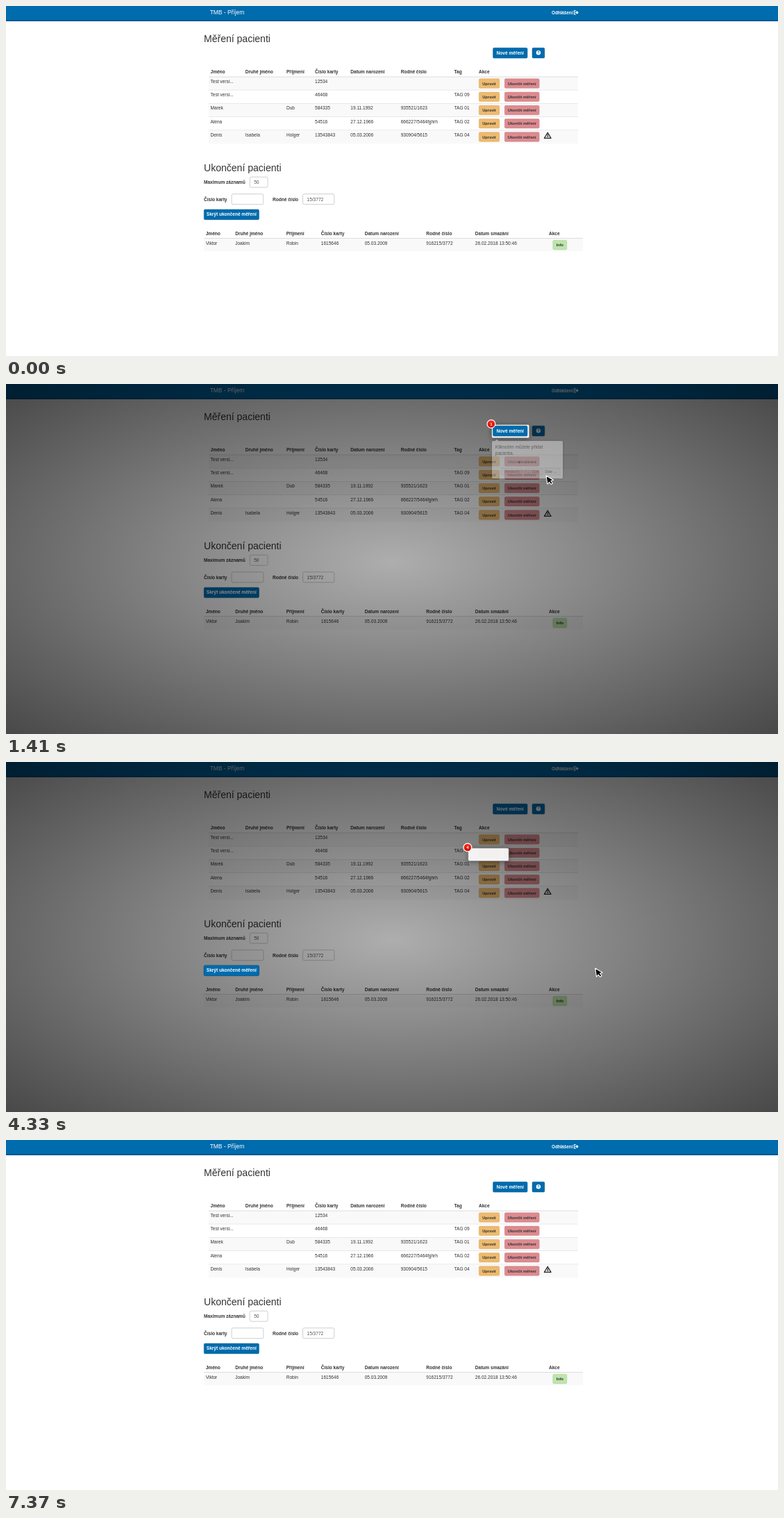
Write an HTML page that moves like this. It is 1112 px wide and 504 px high and loops after 8670 ms.

```html
<!DOCTYPE html>
<html lang="cs">
<head>
<meta charset="utf-8">
<title>Měření pacienti</title>
<style>
html, body { margin: 0; width: 100%; height: 100%; overflow: hidden; background: #fff; }
svg { display: block; position: absolute; left: 0; top: 0; }
text { font: 6.55px "Liberation Sans", Arial, sans-serif; fill: #333; white-space: pre; }
.b { font-weight: 700; }
.s { font-size: 5.65px; font-weight: 700; }
.w { fill: #fff; }
.h { font-size: 14.04px; }
.in { fill: #555; }
.t { font-size: 5.15px; }
#helper { fill: #fff; fill-opacity: .93; stroke: #777; stroke-width: .5; filter: drop-shadow(0 1px 3px rgba(0,0,0,.45)); }
.tip { filter: drop-shadow(0 .5px 2px rgba(0,0,0,.4)); }
</style>
</head>
<body>
<svg id="stage" width="1112" height="504" viewBox="0 0 1112 504">
  <defs>
    <radialGradient id="shade" gradientUnits="userSpaceOnUse" cx="0" cy="0" r="1"
      gradientTransform="translate(556 256) scale(786 358)">
      <stop offset="0" stop-opacity=".4"/><stop offset="1" stop-opacity=".9"/>
    </radialGradient>
    <linearGradient id="red" x1="0" y1="0" x2="0" y2="1">
      <stop offset="0" stop-color="#ff3019"/><stop offset="1" stop-color="#cf0404"/>
    </linearGradient>
  </defs>
  <g id="page"></g>
  <rect id="overlay" width="1112" height="504" fill="url(#shade)"/>
  <g id="guide">
    <rect id="helper" rx="1.8"/>
    <use id="raised"/>
    <g id="badge">
      <circle r="5.9" fill="url(#red)" stroke="#fff" stroke-width="1.2"/>
      <text id="num" class="b w" y="2.1" text-anchor="middle" style="font-size:6px"></text>
    </g>
    <g id="tips"></g>
  </g>
  <path id="cursor" d="M0 0 1 12.2 3.9 9.6 6.4 13 8.6 11.5 6.3 8 10 7Z"
    fill="#000" stroke="#fff" stroke-width="1.1" stroke-linejoin="round"/>
</svg>
<script>
const $ = id => document.getElementById(id);
const LOOP = 8670, BLUE = '#006bad', APP = 'TMB - Příjem';

const text = (x, y, s, cls = '', extra = '') => `<text x="${x}" y="${y}" class="${cls}" ${extra}>${s}</text>`;
const rect = (x, y, w, h, fill, extra = '') => `<rect x="${x}" y="${y}" width="${w}" height="${h}" fill="${fill}" ${extra}/>`;
const button = (x, y, w, h, label, fill, edge, cls, id = '') =>
  `<g ${id && `id="${id}"`}>${rect(x, y, w, h, fill, `rx="1.6" stroke="${edge}" stroke-width=".5"`)}
  ${text(x + w / 2, y + h / 2 + 2.1, label, cls, 'text-anchor="middle"')}</g>`;
const input = (x, y, w, label) =>
  rect(x, y, w, 15, '#fff', 'rx="2" stroke="#bbb" stroke-width=".7"') + text(x + 6, y + 9.9, label, 'in');
const cells = (xs, y, row, cls) => row.map((s, i) => s && text(xs[i], y, s, cls)).join('');

function header() {
  return `<g id="bar">${rect(0, 0, 1112, 22, BLUE)}${rect(0, 20.2, 1112, 1.6, '#00528a')}
    ${text(293.7, 12.4, APP, 'w', 'style="font-size:8.42px"')}
    ${text(786, 11.6, 'Odhlášení', 'b w', 'style="font-size:6.3px"')}
    <path d="M821 6.7H818.3V12H821" fill="none" stroke="#fff" stroke-width="1.1"/>
    <path d="M819.8 8.5H822V6.7L824.8 9.4 822 12.1V10.3H819.8Z" fill="#fff"/></g>`;
}

function measured() {
  const xs = [294.5, 344.7, 404, 445, 496.3, 568.7, 645.5, 681];
  const rows = [
    ['Test versi...', '', '', '12534'],
    ['Test versi...', '', '', '46468', '', '', 'TAG 09'],
    ['Marek', '', 'Dub', '584335', '19.11.1992', '935521/1623', 'TAG 01'],
    ['Alena', '', '', '54516', '27.12.1966', '666227/5464fghrh', 'TAG 02'],
    ['Denis', 'Isabela', 'Holger', '13543843', '05.03.2006', '930904/5615', 'TAG 04']
  ];
  let out = text(285, 52.4, 'Měření pacienti', 'h') +
    button(701.5, 60.3, 49.5, 14.8, 'Nové měření', BLUE, '#005a92', 'b w', 'add') +
    `<g id="help">${rect(758, 60.3, 17.8, 14.6, BLUE, 'id="helpBox" rx="1.6" stroke="#005a92" stroke-width=".5"')}
      <circle id="helpDot" cx="766.9" cy="67.3" r="3.2" fill="#fff"/>
      ${text(766.9, 69.3, '?', 'b', `text-anchor="middle" style="font-size:5.6px;fill:${BLUE}"`)}</g>` +
    cells(xs, 96.8, ['Jméno', 'Druhé jméno', 'Příjmení', 'Číslo karty', 'Datum narození', 'Rodné číslo', 'Tag', 'Akce'], 'b');
  rows.forEach((row, i) => {
    const y = 102 + i * 19.25;
    out += rect(292, y, 532, 19.25, i % 2 ? '#fff' : '#f9f9f9') +
      rect(292, y - .5, 532, i ? .6 : 1, '#ddd') + cells(xs, y + 8.8, row) +
      button(681.3, y + 2.8, 29.4, 13.4, 'Upravit', '#edba70', '#e2a44c', 's', 'edit' + i) +
      button(718.3, y + 2.8, 49.8, 13.4, 'Ukončit měření', '#dc8b90', '#cf7379', 's', 'end' + i);
  });
  return out + `<path d="M780.2 182.2 785 190.4H775.4Z" fill="none" stroke="#222" stroke-width="1.2" stroke-linejoin="round"/>
    <path d="M778.8 185.3H781.4L779.2 188.2H781.8" fill="none" stroke="#222" stroke-width=".9"/>`;
}

function finished() {
  const xs = [287.7, 330.2, 403.7, 453.8, 516.7, 605.3, 675.8, 782];
  return text(285, 238, 'Ukončení pacienti', 'h') +
    text(285, 256.2, 'Maximum záznamů', 'b') + input(351.2, 246.2, 25.8, '50') +
    text(285, 280.7, 'Číslo karty', 'b') + input(325, 270.7, 45.8, '') +
    text(384, 280.7, 'Rodné číslo', 'b') + input(427.5, 270.7, 45.3, '15/3772') +
    button(285.2, 293, 79.2, 14.7, 'Skrýt ukončené měření', BLUE, '#005a92', 'b w', 'hide') +
    cells(xs, 329.8, ['Jméno', 'Druhé jméno', 'Příjmení', 'Číslo karty', 'Datum narození', 'Rodné číslo', 'Datum smazání', 'Akce'], 'b') +
    rect(285, 334.5, 546, 18.8, '#f9f9f9') + rect(285, 334, 546, 1, '#ddd') +
    cells(xs, 343.8, ['Viktor', 'Joakim', 'Robin', '1615646', '05.03.2009', '916215/3772', '26.02.2018 13:50:46']) +
    button(787.8, 337.3, 20, 13.6, 'Info', '#bfe5ad', '#a5d48f', 's') +
    text(285, 505, '1.0.11', '', 'id="version"');
}

// start: highlight begins to move; show: tooltip fades in
const steps = [
  { n: 1, start: 870, show: [1300, 1600], box: [699.7, 58.5, 54, 19.2], el: 'add', tip: [700, 82, 102],
    lines: ['Kliknutím můžete přidat', 'pacienta.'] },
  { n: 2, start: 1760, show: [2090, 2200], box: [679, 102.2, 34, 18.3], el: 'edit0', tip: [679, 124.3, 102],
    lines: ['Kliknutím můžete upravit', 'pacienta.'] },
  { n: 3, start: 3340, show: [3610, 3650], box: [716, 102.2, 55, 18.3], el: 'end0', tip: [716, 124.3, 102],
    lines: ['Kliknutím můžete ukončit', 'měření.'] },
  { n: 4, start: 4310, show: [4590, 4630], box: [282.5, 290.3, 84.7, 20], el: 'hide', tip: [282.5, 314, 102],
    lines: ['Kliknutím můžete skrýt', 'ukončené měření.'] },
  { n: 6, start: 5130, show: [5360, 5500], box: [-3, -3, 1091, 26.5], el: 'bar', tip: [-4, 28, 149],
    lines: [`Kliknutím na ${APP} můžete zaktualizovat`, 'obsah pokud je třeba. Kliknutím na Odhlásit se', 'můžete odhlásit z aplikace.'] }
];
const MOVE = 300, EXIT = 6400;

function tooltip({ n, tip: [x, y, w], lines }) {
  const drop = 8.9 * (lines.length - 1), r = x + w, by = y + drop + 30.2;
  const small = (bx, bw, label, off) => rect(bx, by, bw, 9.8, '#f4f4f4', 'rx="1" stroke="#d0d0d0" stroke-width=".6"') +
    text(bx + bw / 2, by + 6.7, label, 't', `text-anchor="middle" ${off ? 'style="fill:#999"' : ''}`);
  let out = rect(x, y, w, drop + 45, '#fff', 'rx="1.5"') +
    `<path d="M${x + 4.5} ${y}l2.4 -2.6 2.4 2.6Z" fill="#fff"/>`;
  lines.forEach((s, i) => out += text(x + 4.8, y + 11.2 + 8.9 * i, s));
  for (let i = 0; i < 6; i++)
    out += `<circle cx="${x + w / 2 + (i - 2.5) * 4.7}" cy="${y + drop + 22}" r="1.4" fill="${i + 1 === n ? '#999' : '#ccc'}"/>`;
  if (n === 6) {
    out += rect(r - 59.3, by, 26.3, 9.8, '#eef3fb', 'rx="1" stroke="#4a7fc0" stroke-width=".9"') +
      text(r - 46.1, by + 6.7, 'Ukončit', 't', 'text-anchor="middle" style="text-decoration:underline;fill:#345f96"') +
      small(r - 30.5, 26, '← Zpět');
  } else {
    out += small(r - 88.5, 30, 'Přeskočit', true) + small(r - 55, 25, '← Zpět', n === 1) + small(r - 30, 26, 'Dále →');
  }
  return `<g class="tip" id="tip${n}">${out}</g>`;
}

$('page').innerHTML = header() + measured() + finished();
$('tips').innerHTML = steps.map(tooltip).join('');

const path = [
  [110, 1041, 450], [620, 765, 65], [790, 765, 65], [1010, 767.5, 146], [1640, 784, 124], [1760, 784, 124],
  [2220, 751, 142], [2560, 751, 142], [3190, 848.7, 297], [4850, 848.7, 297], [4860, 848, 297.3],
  [5780, 848, 297.3], [5830, 847.5, 298], [6010, 847.5, 298], [6470, 881.5, 350.5], [6870, 914, 374],
  [6980, 924, 383], [7370, 1074, 506]
];
const ramp = (t, a, b) => Math.min(1, Math.max(0, (t - a) / (b - a)));
const easeOut = x => 1 - (1 - x) ** 1.7;
const mix = (a, b, p) => a + (b - a) * p;
const show = (id, on) => $(id).style.display = on ? '' : 'none';

function drawCursor(t) {
  const on = t >= 110 && t < 7370;
  show('cursor', on);
  if (!on) return;
  const i = path.findIndex(k => k[0] > t), a = path[i - 1], b = path[i];
  const p = ramp(t, a[0], b[0]);
  $('cursor').setAttribute('transform', `translate(${mix(a[1], b[1], p)} ${mix(a[2], b[2], p)}) rotate(-4)`);
}

function drawGuide(t) {
  const on = t >= steps[0].start && t < EXIT;
  show('guide', on);
  if (!on) return;
  const i = steps.findLastIndex(s => t >= s.start), cur = steps[i], prev = steps[Math.max(0, i - 1)];
  const p = easeOut(ramp(t, cur.start, cur.start + (cur.n === 6 ? 280 : MOVE)));
  const box = cur.box.map((v, k) => mix(prev.box[k], v, p));
  ['x', 'y', 'width', 'height'].forEach((key, k) => $('helper').setAttribute(key, box[k]));
  $('raised').setAttribute('href', '#' + cur.el);
  $('badge').setAttribute('transform', `translate(${box[0] - .8} ${box[1] - 1})`);
  $('num').textContent = cur.n;
  for (const s of steps) $('tip' + s.n).style.opacity = s === cur ? ramp(t, ...s.show) : 0;
}

function frame(now) {
  const t = now % LOOP;
  $('overlay').style.opacity = .8 * (easeOut(ramp(t, 850, 1150)) - easeOut(ramp(t, EXIT, EXIT + 340)));
  const hover = t >= 620 && t < 1300;
  $('helpBox').setAttribute('fill', hover ? '#e9edf2' : BLUE);
  $('helpBox').setAttribute('stroke', hover ? '#3f7fd0' : '#005a92');
  $('helpBox').setAttribute('stroke-width', hover ? 1.2 : .5);
  $('helpDot').setAttribute('fill', hover ? '#cfd6de' : '#fff');
  $('help').lastElementChild.style.opacity = hover ? .15 : 1;
  show('version', t >= 5380 && t < EXIT);
  drawGuide(t);
  drawCursor(t);
}

function tick() {
  frame(performance.now());
  requestAnimationFrame(tick);
}
tick();
</script>
</body>
</html>
```
